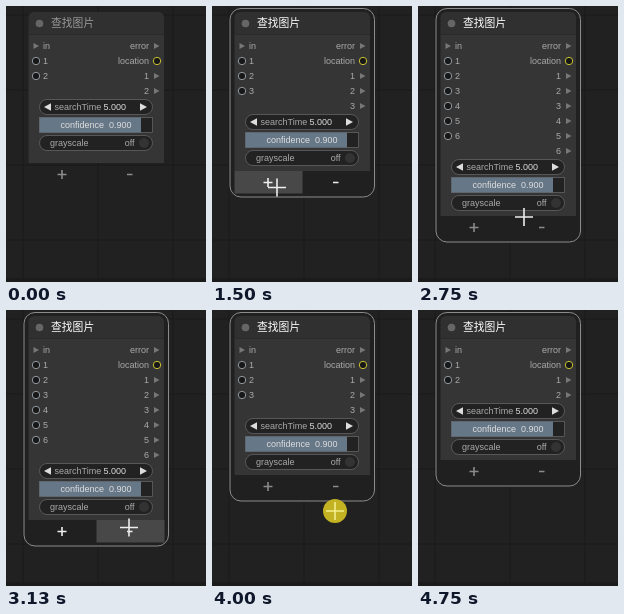
Write an HTML page that moves like this. It is 200x276 px and loops after 5.38 s.

```html
<!DOCTYPE html>
<html lang="zh">
<head>
<meta charset="utf-8">
<style>
  html, body { margin: 0; width: 100%; height: 100%; overflow: hidden; background: #212121; }
  svg { display: block; width: 200px; height: 276px; }
  text { font: 9px "Liberation Sans", Arial, sans-serif; fill: #aaa; }
  .end { text-anchor: end; }
  .mid { text-anchor: middle; }
  .value { fill: #ddd; }
  #title { font: 10.8px "Noto Sans CJK SC", "Noto Sans CJK", sans-serif; }
  .box { fill: #222; stroke: #666; stroke-width: .75; }
  .sign { stroke-width: 1.6; }
</style>
</head>
<body>
<svg viewBox="0 0 200 276">
  <defs>
    <pattern id="grid" x="16.5" y="8.5" width="75" height="75" patternUnits="userSpaceOnUse">
      <path d="M0 .5H75M.5 0V75" stroke="#191919"/>
    </pattern>
  </defs>
  <rect width="200" height="276" fill="#212121"/>
  <rect width="200" height="276" fill="url(#grid)"/>
  <rect y="272" width="200" height="4" fill="#1b1b1b"/>

  <rect id="outline" x="18" y="2.5" width="144.5" rx="11" fill="#202020" stroke="#8c8c8c"/>
  <path id="body"  fill="#353535"/>
  <path d="M22.5 28.5V12q0-6 6-6H152q6 0 6 6V28.5z" fill="#303030"/>
  <path d="M22.5 28.5H158" stroke="#2a2a2a"/>
  <circle cx="33.5" cy="17.5" r="3.8" fill="#666"/>
  <text id="title" x="45" y="21.3">查找图片</text>
  <g id="ports"></g>

  <g id="widgets">
    <rect class="box" x="33.5" y="93.5" width="113" height="15" rx="7.5"/>
    <path d="M45 97.2V104.8L38 101zM134 97.2V104.8L141 101z" fill="#ddd"/>
    <text x="48.5" y="104">searchTime</text>
    <text class="value end" x="120" y="104">5.000</text>
    <rect class="box" x="33.5" y="111.5" width="113" height="15"/>
    <rect x="33.5" y="111.5" width="101.5" height="15" fill="#678"/>
    <text class="value mid" x="90" y="122" xml:space="preserve">confidence  0.900</text>
    <rect class="box" x="33.5" y="129.5" width="113" height="15" rx="7.5"/>
    <text x="44" y="140">grayscale</text>
    <text class="end" x="128.5" y="140">off</text>
    <circle cx="138" cy="137" r="5" fill="#333"/>
  </g>

  <g id="bar">
    <rect id="hover" width="68" height="22.5" fill="#484848"/>
    <path id="signs" class="sign" d="M51.5 11.5H60.5M56 7V16M121 11.5H126.5"/>
  </g>

  <g id="cursor">
    <circle id="press" r="12" fill="#c3b222"/>
    <path id="cross" d="M-9 0H9M0-9V9" stroke-width="1.6"/>
  </g>
</svg>
<script>
const LOOP = 5380, TICK = 125, ROW = 15, MAX = 6;
const $ = id => document.getElementById(id);

// [ms, value] steps
const counts = [[0, 2], [1250, 3], [1625, 4], [2250, 5], [2500, 6],
                [3375, 5], [3750, 4], [3875, 3], [4375, 2]];
const presses = [[1125, 1375], [1625, 1750], [2250, 2375], [2500, 2625],
                 [3375, 3750], [3750, 4125], [4375, 4500]];
// [ms, x, y]
const path = [[375, 96, 270], [625, 72, 196], [875, 63, 175], [1375, 64, 177], [1625, 66, 186],
              [2125, 67, 187], [2250, 66, 193], [2500, 66, 207], [2625, 80, 210], [2750, 106, 211],
              [3000, 123, 220], [3250, 123, 215], [3375, 123, 206], [3500, 123, 202],
              [4000, 123, 201], [4250, 123, 179], [4500, 123, 172], [4625, 150, 225]];

const rowY = row => 40 + ROW * row;
const arrow = (x, y) => `<path d="M${x - 2.5} ${y - 3}L${x + 3} ${y}L${x - 2.5} ${y + 3}z" fill="#777"/>`;
const ring = (x, y, color) => `<circle cx="${x}" cy="${y}" r="3.7" fill="#171717" stroke="${color}"/>`;
const label = (x, y, text, cls = "") => `<text class="${cls}" x="${x}" y="${y + 3.2}">${text}</text>`;
const input = (row, text) => label(37, rowY(row), text) +
  (row ? ring(30, rowY(row), "#929aa0") : arrow(30, rowY(row)));
const output = (row, text) => label(143, rowY(row), text, "end") +
  (row === 1 ? ring(151, rowY(row), "#c8c232") : arrow(150.5, rowY(row)));

let ports = input(0, "in") + output(0, "error") + output(1, "location");
for (let k = 1; k <= MAX; k++) ports += `<g class="pair">${input(k, k)}${output(k + 1, k)}</g>`;
$("ports").innerHTML = ports;
const pairs = [...document.querySelectorAll(".pair")];

function cursorAt(t) {
  const next = path.findIndex(p => p[0] > t);
  if (next < 1) return null;
  const [a, b] = [path[next - 1], path[next]];
  const u = (t - a[0]) / (b[0] - a[0]);
  return [1, 2].map(i => a[i] + (b[i] - a[i]) * u);
}

function show(id, on) { $(id).style.display = on ? "" : "none"; }

function draw(time) {
  const t = Math.floor((time % LOOP) / TICK) * TICK;
  const count = counts.filter(c => c[0] <= t).pop()[1];
  const selected = t >= 1125;
  const shift = ROW * (count - 2);
  const barY = selected ? 150 + shift : 157;
  const cursor = cursorAt(t);
  const pressed = presses.some(([from, to]) => t >= from && t < to);
  const hovered = cursor && cursor[0] > 22 && cursor[0] < 158 &&
                  cursor[1] > barY + 2 && cursor[1] < barY + 22.5;

  show("outline", selected);
  $("outline").setAttribute("height", 173.5 + shift);
  $("body").setAttribute("d", `M22.5 28H158V${barY}H22.5z`);
  $("title").style.fill = selected ? "#fff" : "#999";
  pairs.forEach((p, i) => p.style.display = i < count ? "" : "none");
  $("widgets").setAttribute("transform", `translate(0 ${shift})`);
  $("bar").setAttribute("transform", `translate(0 ${barY})`);
  $("signs").style.stroke = hovered ? "#eee" : "#8a8a8a";
  show("hover", hovered);
  if (hovered) $("hover").setAttribute("x", cursor[0] < 91 ? 22.5 : 90.5);

  show("cursor", cursor);
  if (cursor) $("cursor").setAttribute("transform", `translate(${cursor})`);
  show("press", pressed);
  $("cross").style.stroke = !pressed ? "#eee" : hovered ? "#cbbb32" : "#f4ee8c";
}

const start = performance.now();
function frame() {
  draw(performance.now() - start);
  requestAnimationFrame(frame);
}
frame();
</script>
</body>
</html>
```
